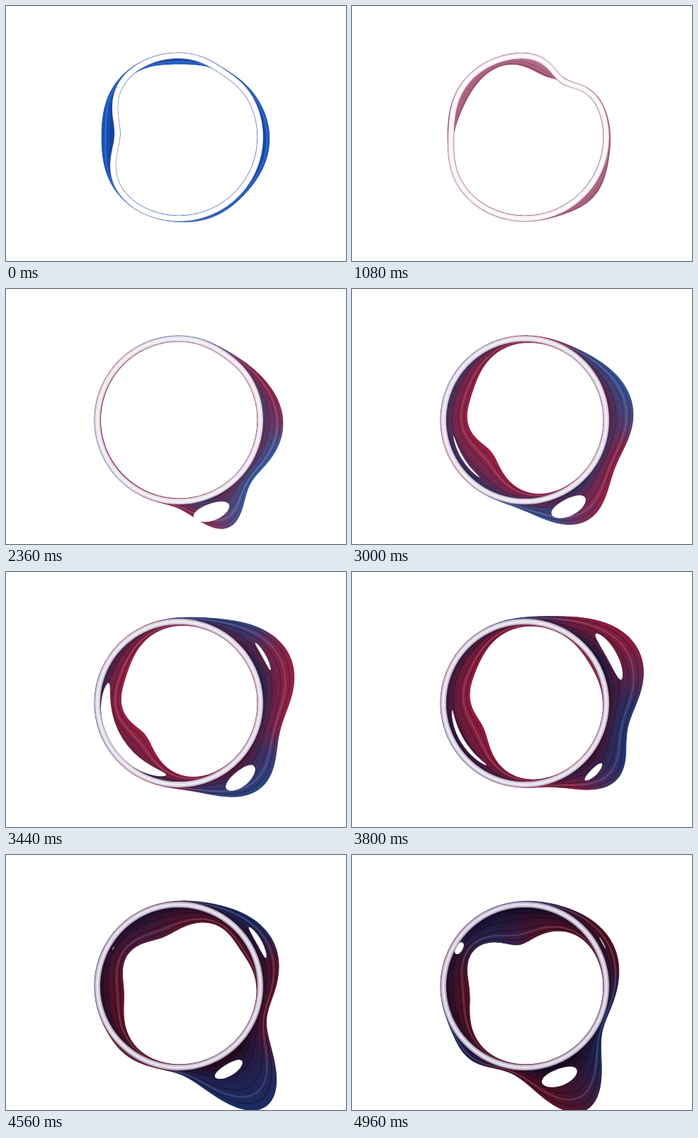
An HTML page with a canvas for the animation above (5 s loop, 480 px wide and 360 px high).

```html
<!DOCTYPE html>
<html lang="en">
<head>
<meta charset="utf-8">
<title>Ribbon ring</title>
<style>
  html, body { margin: 0; width: 100%; height: 100%; overflow: hidden; background: #fff; }
  canvas { display: block; width: 480px; height: 360px; }
</style>
</head>
<body>
<canvas id="stage" width="480" height="360"></canvas>
<script>
const ctx = document.getElementById('stage').getContext('2d');
const LOOP = 5000, STEP = 40, CX = 244, CY = 185, SIDES = 240, LAYERS = 8;
const WHITE = [255, 255, 255], BLACK = [10, 0, 16];

const rad = a => a * Math.PI / 180;
const mix = (a, b, u) => a + (b - a) * u;
const blend = (a, b, u) => a.map((v, i) => mix(v, b[i], u));
const css = (c, alpha = 1) => `rgba(${c.map(Math.round)},${alpha})`;
const bell = (x, w) => Math.exp(-((x / w) ** 2));
const span = (t, from, to) => Math.min(1, Math.max(0, (t - from) / (to - from)));
const ease = (t, from, to) => {
  const u = span(t, from, to);
  return u * u * (3 - 2 * u);
};
const turn = d => ((d + 540) % 360 + 360) % 360 - 180;

// Bumps on the circle; angles run clockwise from the right
function poseAt(t) {
  const start = 1 - span(t, 0, 1750);
  const grow = Math.sin(span(t, 1100, 2360) * Math.PI / 2);
  const sag = ease(t, 2300, 3000);
  const notch = { at: -56, wide: 18, high: -19 * bell(t - 1080, 850) };
  const side = {
    at: 4 - 28 * ease(t, 2600, 3600), wide: 36,
    high: 9 * start ** 2 + grow * (28 + 30 * bell(t - 3750, 600) - 10 * ease(t, 4200, 4960))
  };
  const lobe = {
    at: 53 + 13 * Math.cos((t - 2500) / 2700 * 2 * Math.PI),
    wide: 21 + 6 * bell(t - 3250, 400) - 4 * bell(t - 2360, 300),
    high: 3 + 6 * ease(t, 0, 1080) + grow * (37 + 30 * ease(t, 3700, 4500))
      + 10 * bell(t - 2660, 160) + 16 * bell(t - 4500, 180)
  };
  return {
    grow, side, lobe,
    ring: [notch, { at: 182, wide: 30, high: -28 * start }],
    outer: [notch, side, lobe,
      { at: 180, wide: 32, high: -10 * (1 - ease(t, 1080, 1700)) },
      { at: 127, wide: 18, high: 10 * ease(t, 4300, 4960) }],
    inner: [
      { at: 270 + 20 * span(t, 0, 1080), wide: 25,
        high: -(8 + 12 * ease(t, 0, 1080)) * (1 - ease(t, 1080, 1900)) },
      { at: 204 + 58 * ease(t, 3500, 4960), wide: 40,
        high: -14 * bell(t - 1080, 500) - 26 * (sag + ease(t, 4200, 4960)) },
      { at: 136 + 38 * ease(t, 3500, 4300), wide: 38,
        high: -44 * sag + 12 * ease(t, 3440, 4400) },
      { at: -31, wide: 22, high: -20 * bell(t - 4250, 350) }]
  };
}

function radii(base, bumps) {
  return Array.from({ length: SIDES }, (_, j) => bumps.reduce(
    (r, b) => r + b.high * bell(turn(j * 360 / SIDES - b.at), b.wide), base));
}

function curvesAt(pose) {
  const ring = radii(115, pose.ring);
  return {
    ring,
    outer: radii(119, pose.outer).map((r, j) => Math.max(r, ring[j] + 4)),
    inner: radii(111, pose.inner).map((r, j) => Math.min(r, ring[j] - 4))
  };
}

function paintsAt(t) {
  const opening = ease(t, 0, 1080), later = ease(t, 1080, 2200);
  const blue = blend([45, 108, 180], [22, 50, 112], ease(t, 2400, 4300));
  const red = blend([168, 30, 62], [100, 18, 34], ease(t, 3500, 4960));
  const gloom = 0.35 + 0.4 * ease(t, 2300, 4960);
  const edge0 = blend([24, 92, 205], [150, 66, 98], opening);
  const core0 = blend([16, 50, 125], [222, 164, 186], opening);
  // Blue and red sectors drift anticlockwise
  const peak = 35 - 0.095 * (t - 2360);
  const wave = a => 0.5 + 0.5 * Math.tanh(2.2 * Math.cos(rad(3 * (a - peak))));
  const tint = u => blend(red, blue, u);
  const dark = u => blend(tint(u), BLACK, gloom);
  return {
    outEdge: a => blend(edge0, tint(wave(a)), later),
    outCore: a => blend(core0, dark(1 - wave(a)), later),
    inEdge: a => blend(edge0, tint(0.7 * bell(turn(a - 235), 35) * ease(t, 4200, 4960)), later),
    inCore: a => blend(core0, dark(0.9), later)
  };
}

function band(...curves) {
  const path = new Path2D();
  for (const curve of curves) {
    curve.forEach((r, j) => {
      const a = rad(j * 360 / SIDES);
      path[j ? 'lineTo' : 'moveTo'](CX + r * Math.cos(a), CY + r * Math.sin(a));
    });
    path.closePath();
  }
  return path;
}

function conic(paint, alpha = 1) {
  const g = ctx.createConicGradient(0, CX, CY);
  for (let a = 0; a <= 360; a += 15) g.addColorStop(a / 360, css(paint(a), alpha));
  return g;
}

function fill(path, style) {
  ctx.fillStyle = style;
  ctx.fill(path, 'evenodd');
}

function stroke(path, width, style) {
  ctx.lineWidth = width;
  ctx.strokeStyle = style;
  ctx.stroke(path);
}

// One side of the ribbon, shaded from the ring to its free edge
function drawFold(t, ring, rim, edge, core) {
  fill(band(ring, rim), conic(core));
  const shade = conic(edge, 0.24);
  const stripe = conic(a => blend(core(a), BLACK, 0.6), 0.12 + 0.4 * t / LOOP);
  for (let n = 1; n < LAYERS; n++) {
    const line = blend(ring, rim, n / LAYERS);
    fill(band(line, rim), shade);
    if (n % 2) stroke(band(line), 1.2, stripe);
  }
  const sheen = conic(a => blend(edge(a), [235, 215, 235], 0.5), 0.28);
  stroke(band(blend(ring, rim, 0.75)), 2.5, sheen);
  stroke(band(rim), 1, conic(edge, 0.7));
}

// An opening that follows the arc and swells with its size
function opening(at, half, radius, thick, size) {
  if (size < 0.03) return;
  ctx.beginPath();
  for (let q = 0; q < 360; q += 9) {
    const a = rad(at - half * Math.sqrt(size) * Math.cos(rad(q)));
    const r = radius + thick * size * Math.sin(rad(q));
    ctx.lineTo(CX + r * Math.cos(a), CY + r * Math.sin(a));
  }
  ctx.fillStyle = '#fff';
  ctx.fill();
}

function drawOpenings(t, { grow, side, lobe }) {
  opening(lobe.at + 5, 11, 138, 12, grow * (1 - bell(t - 4100, 420)));
  opening(-29, 17, 119 + 0.36 * side.high, 9, bell(t - 4050, 550));
  opening(148, 48, 103, 9, bell(t - 3440, 330));
  opening(210, 5, 107, 5, bell(t - 4960, 250));
}

function drawRing(t, ring, edge) {
  const u = t / LOOP, path = band(ring);
  stroke(path, 9, conic(a => blend(edge(a), [150, 110, 135], 0.6), 0.55));
  stroke(path, 7.8, css(blend([255, 248, 251], [178, 164, 188], u)));
  stroke(path, 5, css(blend(WHITE, [208, 200, 216], u)));
  stroke(path, 2.4, css(blend(WHITE, [232, 228, 238], u)));
}

function draw(t) {
  const pose = poseAt(t), { ring, outer, inner } = curvesAt(pose), paint = paintsAt(t);
  ctx.fillStyle = '#fff';
  ctx.fillRect(0, 0, 480, 360);
  drawFold(t, ring, outer, paint.outEdge, paint.outCore);
  drawFold(t, ring, inner, paint.inEdge, paint.inCore);
  drawOpenings(t, pose);
  drawRing(t, ring, paint.outEdge);
}

const begin = performance.now();
function tick() {
  const t = (performance.now() - begin) % LOOP;
  draw(Math.floor(t / STEP) * STEP);
  requestAnimationFrame(tick);
}
tick();
</script>
</body>
</html>
```
